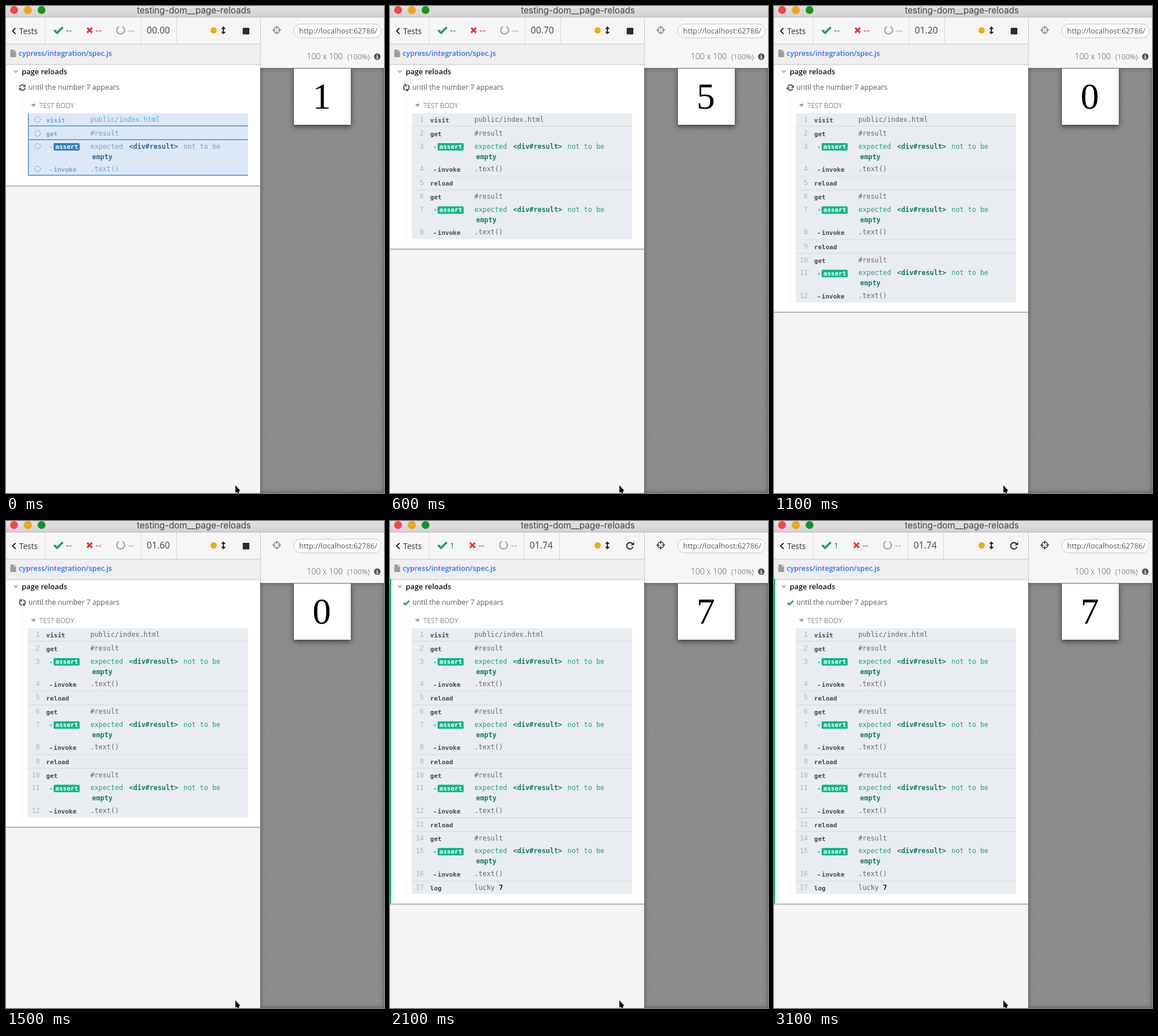
Animation, 659 px wide and 849 px high, one loop 3.2 s. Source, as an HTML page:

```html
<!DOCTYPE html>
<html lang="en">
<head>
<meta charset="utf-8">
<title>Page reloads</title>
<style>
  html, body { margin: 0; width: 100%; height: 100%; overflow: hidden; background: #f4f3f6; }
  #app { position: relative; width: 659px; height: 849px; overflow: hidden; background: #f4f3f6; }
  #app > * { position: absolute; box-sizing: border-box; }
  .titlebar { left: 0; top: 0; width: 659px; height: 20px; background: linear-gradient(#e1dfe1, #d3d1d3); border-bottom: 1px solid #bcbabc; }
  .toolbar { left: 0; top: 20px; width: 443px; height: 47px; background: #f6f5f8; border-bottom: 1px solid #d3d2d4; }
  .panel { left: 0; top: 101px; width: 443px; background: #fff; box-shadow: 0 1px 2px rgba(0,0,0,.5); }
  .panel.passed { border-left: 2px solid #10b07f; }
  .path { left: 0; top: 67px; width: 443px; height: 34px; background: #efeef1; box-shadow: 0 1px 3px rgba(0,0,0,.28); }
  .preview { left: 443px; top: 108px; width: 216px; height: 741px;
    background: repeating-linear-gradient(135deg, #918f91 0 1.77px, #7f7d7f 2.65px, #918f91 3.535px);
    box-shadow: inset 0 0 8px #555; }
  .page { left: 502px; top: 109px; width: 99px; height: 98px; background: #fff; box-shadow: 0 3px 9px rgba(0,0,0,.6); }
  .header { left: 443px; top: 20px; width: 216px; height: 88px; background: #f6f5f8; border-left: 1px solid #c6c5c8; }
  svg { left: 0; top: 0; font-family: "Open Sans", "Noto Sans", sans-serif; }
  text { white-space: pre; }
  .mono { font: 11.87px "DejaVu Sans Mono", monospace; fill: #686a6d; }
  .name { font: bold 11.05px "DejaVu Sans Mono", monospace; fill: #46484b; }
  .index { font: 11.87px "DejaVu Sans Mono", monospace; fill: #b1b5ba; text-anchor: end; }
  .good { fill: #1fa57a; }
  .strong { font-weight: bold; fill: #11805d; }
  .badge { fill: #0fb585; }
  .white { fill: #fff; }
  .spin, .blue { display: none; }
  .pending .spin, .pending .blue { display: inline; }
  .pending .index { display: none; }
  .pending .mono, .pending .name { fill: #6ea5d8; }
  .pending .strong { fill: #2b6ca3; }
  .pending .badge { fill: #337fc0; }
  .pending .name.white { fill: #fff; }
  .line { fill: none; stroke-width: 2; }
</style>
</head>
<body>
<div id="app">
  <div class="titlebar"></div>
  <div class="toolbar"></div>
  <div class="panel" id="panel"></div>
  <div class="path"></div>
  <div class="preview"></div>
  <div class="page"></div>
  <div class="header"></div>
  <svg width="659" height="849" viewBox="0 0 659 849">
    <g stroke="#000" stroke-opacity=".15" stroke-width=".7">
      <circle cx="14" cy="7" r="6.7" fill="#fb4340"/>
      <circle cx="38" cy="7" r="6.7" fill="#f3a50c"/>
      <circle cx="62" cy="7" r="6.7" fill="#0b9a1c"/>
    </g>
    <text x="327.5" y="13" text-anchor="middle" font-family="Inter, sans-serif" font-size="15.25" fill="#444">testing-dom__page-reloads</text>

    <path class="line" d="M16.5 38.5L11.5 43.5L16.5 48.5" stroke="#222"/>
    <text x="23" y="48.5" font-size="13.8" fill="#333">Tests</text>
    <path d="M68.5 20V66" stroke="#d9d8da"/>
    <path class="line" d="M84 42L89 47L99 37" stroke="#1a9b6b" style="stroke-width:3.6"/>
    <text id="passes" x="104" y="47.5" fill="#1a9b6b"></text>
    <g id="tail">
      <path class="line" d="M141.5 38L150 46.5M150 38L141.5 46.5" stroke="#e03b35" style="stroke-width:3.2"/>
      <text x="156" y="47.5" font-size="17" fill="#e03b35">--</text>
      <path class="line" d="M203 35.9A6.8 6.8 0 1 1 197 35.9" stroke="#9a9a9d"/>
      <text x="213" y="47.5" font-size="17" fill="#9a9a9d">--</text>
      <path d="M235.5 20V66M297.5 20V66" stroke="#d9d8da"/>
      <text id="clock" x="245.3" y="48" font-size="15.9" fill="#444"></text>
    </g>
    <circle cx="362" cy="42.5" r="5.6" fill="#f5a61d"/>
    <path d="M379 35.5L383 40H380V45H383L379 49.5L375 45H378V40H375Z" fill="#222"/>
    <rect id="stop" x="412.7" y="38" width="11.5" height="11.5" rx="1" fill="#2b2a2c"/>
    <g id="redo">
      <path class="line" d="M422.6 39.6A5.6 5.6 0 1 0 423.6 45.2" stroke="#2b2a2c"/>
      <path d="M425.5 36.5V42.2H419.8Z" fill="#2b2a2c"/>
    </g>
    <g id="target" fill="none" stroke-width="1.5">
      <circle cx="472" cy="42" r="5.3"/>
      <path d="M472 34.5V40M472 44V49.5M464.5 42H470M474 42H479.5"/>
    </g>
    <rect x="501.5" y="31.5" width="153" height="24" rx="12" fill="#fff" stroke="#c5c4c7"/>
    <text x="511" y="47.5" font-size="12.85" fill="#555">http://localhost:62786/</text>
    <text x="524.5" y="93" font-size="14.1" font-weight="300" fill="#555">100 x 100</text>
    <text x="595" y="93" font-size="12.7" font-weight="300" fill="#555">(100%)</text>
    <circle cx="647.3" cy="88.2" r="5.7" fill="#555"/>
    <path d="M647.3 84.7V86.2M646 88H647.5V91.5M645.8 91.4H649" fill="none" stroke="#fff" stroke-width="1.4"/>
    <text id="digit" x="550.5" y="179.3" text-anchor="middle" font-family="'Liberation Serif', serif" font-size="64"></text>

    <path d="M7.5 76H13.5V80H17.5V89H7.5ZM14.3 76L17.5 79.2H14.3Z" fill="#9c9b9e"/>
    <text x="22" y="87" font-size="12.55" font-weight="600" fill="#2f74e6">cypress/integration/spec.js</text>
    <path d="M12.5 112.5H21.5L17 117.5Z" fill="#b5b4b6"/>
    <text x="27.5" y="119" font-size="12.85" font-weight="600" fill="#111">page reloads</text>
    <g id="refresh" fill="#555"></g>
    <path id="tick" class="line" d="M23.5 142.5L27 146L33.5 139" stroke="#1a9b6b" style="stroke-width:2.6"/>
    <text x="39" y="146" font-size="12.45" fill="#5c5c5e">until the number 7 appears</text>
    <path d="M43.5 170.5H52.5L48 176.5Z" fill="#a5a4a7"/>
    <text x="58" y="177.5" font-size="11.75" fill="#8b8a8d">TEST BODY</text>
    <path id="guide" stroke="#c9c8cb" stroke-dasharray="1 1.5"/>
    <g id="log"></g>

    <path d="M399.5 834.5V849.5L402.5 847L405 852H408L406 846H409.5Z" fill="#000" stroke="#fff" stroke-width=".8"/>
  </svg>
</div>
<script>
const $ = id => document.getElementById(id);
const LOOP = 3200, STEP = 100, TOP = 187, CYCLE = 110.33, ROW = 22;

// Each step: start time, number of cycles in the log, digit on the page
const steps = [
  { at: 0, cycles: 1, digit: 1, pending: true },
  { at: 100, cycles: 1, digit: 1 },
  { at: 600, cycles: 2, digit: 5 },
  { at: 1100, cycles: 3, digit: 0 },
  { at: 1700, cycles: 4, digit: 7, passed: true }
];

const text = (cls, x, y, s) => `<text class="${cls}" x="${x}" y="${y}">${s}</text>`;

function index(n, y) {
  let dots = '';
  for (let i = 0; i < 8; i++) {
    const a = i * Math.PI / 4;
    dots += `<circle cx="${55 + 5 * Math.cos(a)}" cy="${y - 4 + 5 * Math.sin(a)}" r="1"/>`;
  }
  return text('index', 59, y, n) + `<g class="spin" fill="#6ea5d8">${dots}</g>`;
}

function cycle(k) {
  const y = TOP + k * CYCLE, n = k * 4 + 1;
  const divider = dy => `<path d="M38 ${y + dy}H422" stroke="#d0d7dd"/>`;
  return `<g class="cycle"><rect x="38" y="${y}" width="384" height="${CYCLE - 1}" fill="#e9edf1"/>` +
    `<g class="blue"><rect x="38" y="${y}" width="384" height="${CYCLE - 1}" fill="#dde8f6"/>` +
    `<path class="line" d="M39 ${y}V${y + 109}M38 ${y + 22}H422M38 ${y + 46}H422M38 ${y + 108}H422" stroke="#6ea5d8"/></g>` +
    (k ? divider(-.5) + divider(23.5) : `<g class="index">${divider(22.5)}</g>`) +
    index(n, y + 15) + text('name', 70, y + 16, k ? 'reload' : 'visit') +
    (k ? '' : text('mono', 147, y + 15, 'public/index.html')) +
    index(n + 1, y + 39) + text('name', 70, y + 40, 'get') + text('mono', 147, y + 39, '#result') +
    index(n + 2, y + 61.5) + text('name good', 75, y + 62, '-') +
    `<rect class="badge" x="83" y="${y + 52}" width="45.5" height="13" rx="2"/>` +
    text('name white', 86, y + 62, 'assert') +
    text('mono good', 147, y + 61.5, 'expected') +
    text('mono strong', 214.5, y + 61.5, '&lt;div#result&gt;') +
    text('mono good', 309.5, y + 61.5, 'not to be') +
    text('mono strong', 150, y + 79.5, 'empty') +
    index(n + 3, y + 101) + text('name', 75, y + 102, '-') + text('name', 83, y + 102, 'invoke') +
    text('mono', 147, y + 101, '.text()') + '</g>';
}

function lastRow() {
  const y = TOP + 4 * CYCLE;
  return `<g id="last"><rect x="38" y="${y - 1}" width="384" height="${ROW + 1}" fill="#e9edf1"/>` +
    `<path d="M38 ${y - .5}H422" stroke="#d0d7dd"/>` +
    index(17, y + 15) + text('name', 70, y + 16, 'log') + text('mono', 147, y + 15, 'lucky') +
    `<text class="mono" x="190" y="${y + 15}" style="font-weight:bold;fill:#222">7</text></g>`;
}

$('log').innerHTML = [0, 1, 2, 3].map(cycle).join('') + lastRow();
const cycles = [...document.querySelectorAll('.cycle')];

const halfArrow = '<path class="line" d="M-4.7 -.8A4.7 4.7 0 0 1 3.6 -3" stroke="#555"/><path d="M5.6 -5.6V-.6H.6Z"/>';
$('refresh').innerHTML = `${halfArrow}<g transform="rotate(180)">${halfArrow}</g>`;

const show = (el, on) => { el.style.display = on ? '' : 'none'; };

function render(time) {
  const t = Math.floor(time % LOOP / STEP) * STEP;
  const { cycles: count, digit, pending = false, passed = false } = steps.findLast(s => s.at <= t);
  const bottom = TOP + count * CYCLE + (passed ? ROW : -1);

  cycles.forEach((el, i) => show(el, i < count));
  $('log').classList.toggle('pending', pending);
  for (const id of ['last', 'redo', 'tick']) show($(id), passed);
  for (const id of ['stop', 'refresh']) show($(id), !passed);

  $('panel').classList.toggle('passed', passed);
  $('panel').style.height = bottom + 16.5 - 101 + 'px';
  $('guide').setAttribute('d', `M28.5 160V${bottom}`);
  $('refresh').setAttribute('transform', `translate(28.5 142.2) rotate(${t * .18})`);
  $('tail').setAttribute('transform', `translate(${passed ? -2 : 0} 0)`);
  $('target').setAttribute('stroke', passed ? '#333' : '#858487');
  $('digit').textContent = digit;
  $('passes').textContent = passed ? '1' : '--';
  $('passes').setAttribute('font-size', passed ? 15 : 17);
  $('clock').textContent = (passed ? 1.74 : t && (t + STEP) / 1000).toFixed(2).padStart(5, '0');
}

const start = performance.now();
function frame() {
  render(performance.now() - start);
  requestAnimationFrame(frame);
}
frame();
</script>
</body>
</html>
```
